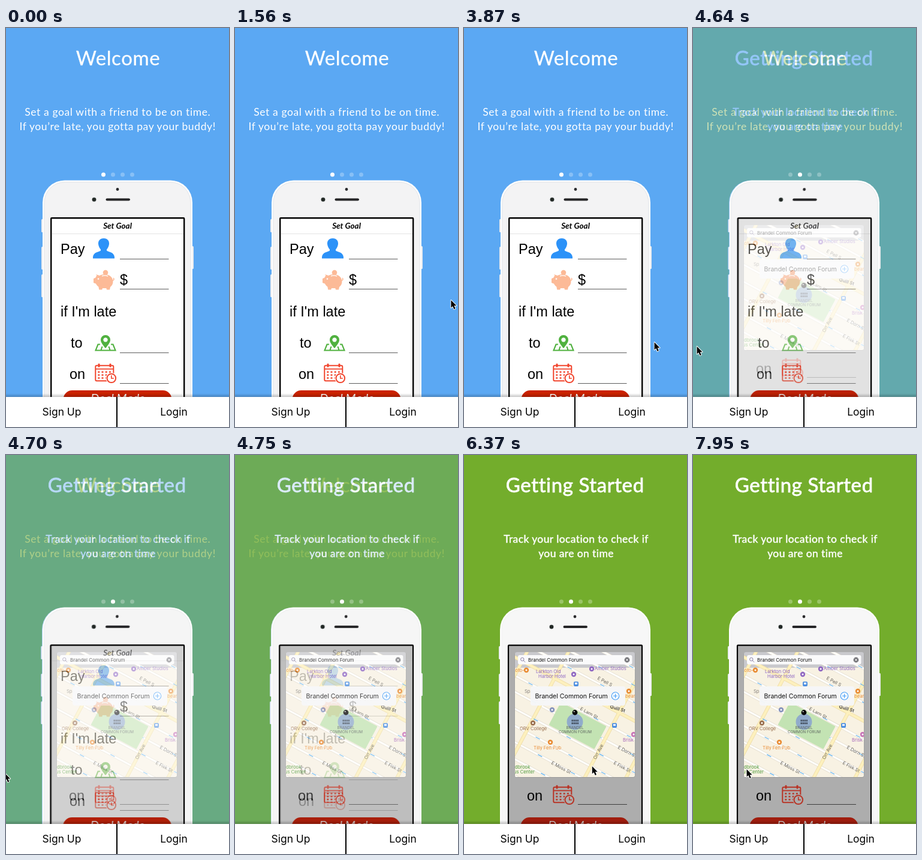
These frames come from a looping animation (372 px wide and 664 px high, 8000 ms). An HTML page:

```html
<!DOCTYPE html>
<html lang="en">
<head>
<meta charset="utf-8">
<title>Welcome tour</title>
<style>
  html, body { margin: 0; width: 100%; height: 100%; overflow: hidden; background: #5ba8f3; }
  svg { display: block; }
  text { white-space: pre; }
  .brand { font-family: Lato, sans-serif; fill: #fff; text-anchor: middle; }
  .title { font-size: 33px; letter-spacing: .6px; }
  .lead { font-size: 17.5px; letter-spacing: .6px; }
  .form { font-family: "Liberation Sans", sans-serif; font-size: 23.5px; }
  .script { font-family: Lato, cursive; font-style: italic; text-anchor: middle; }
  .ui { font-family: Inter, sans-serif; }
  .map { font-family: Inter, "Open Sans", sans-serif; font-size: 7.6px; }
  .tiny { font-size: 6.3px; text-anchor: middle; }
</style>
</head>
<body>
<svg id="stage" width="372" height="664" viewBox="0 0 372 664"></svg>
<script>
const LOOP = 8000;

// ---- drawing helpers ----
const text = (x, y, s, cls, more = '') => `<text x="${x}" y="${y}" class="${cls}" ${more}>${s}</text>`;
const rect = (x, y, w, h, fill, r = 0, more = '') =>
  `<rect x="${x}" y="${y}" width="${w}" height="${h}" rx="${r}" fill="${fill}" ${more}/>`;
const dot = (x, y, r, fill, more = '') => `<circle cx="${x}" cy="${y}" r="${r}" fill="${fill}" ${more}/>`;
const path = (d, fill, more = '') => `<path d="${d}" fill="${fill}" ${more}/>`;
const line = (d, color, w = 1, more = '') => path(d, 'none', `stroke="${color}" stroke-width="${w}" ${more}`);
const move = (x, y, body) => `<g transform="translate(${x} ${y})">${body}</g>`;

function phone(dx, dy, width, face, rim) {
  const x = 61 + dx;
  return [[318, 22], [364, 38], [410, 38]].map(([y, h]) => rect(x - 2, y, 4, h, '#e9ebee', 1.5)).join('')
    + rect(x + width - 2, 363, 4, 38, '#e9ebee', 1.5)
    + rect(x, 253.5, width, 440, '#fdfdfd', 37)
    + rect(x + 3, 256.5, width - 6, 440, face, 34, `stroke="${rim}" stroke-width="1"`)
    + dot(186 + dx, 268.5 + dy, 2.4, '#2b2b2d')
    + dot(147 + dx, 285.5 + dy, 4.2, '#dcdfe0') + dot(147 + dx, 285.5 + dy, 3.3, '#222825')
    + rect(166.5 + dx, 283.4 + dy, 40.5, 4.2, '#262628', 2.1);
}

// ---- form icons ----
const person = path('M163 350c6.5 0 9.5 4.5 9 9.5c-.3 3.5-2 7-4 9v2c3 2.5 12 2 13 10.5v2.5h-36v-2.5c1-8.5 10-8 13-10.5v-2c-2-2-3.7-5.5-4-9c-.5-5 2.5-9.5 9-9.5z', '#2c92f8');

const piggy = (() => {
  const c = '#fcba97';
  return dot(166, 407, 4.3, c)
    + path('M150 410l6 2c3-1.5 6-2 9-2c8 0 13.5 5 13.5 12c0 4-1.8 7-4.5 9l-1 4.5h-5l-.7-2.5h-6.3l-.7 2.5h-5l-1-5c-2-1.3-3.3-3-4.3-5l-4-1.500v-7l3.5-1.5c.5-1.7 1.2-2.7 2-3.5z', c)
    + line('M178 420c2 0 2.7-2.5 1-4', c, 1.6) + dot(154, 417.5, 1.3, '#fff')
    + line('M160 412.8q5.5-1.8 10 .3', '#fff', 1.3);
})();

const place = (() => {
  const c = '#50b13f';
  return line('M157 526.5h-3.5l-4 10h33l-4-10h-3.5M158.5 536l2-6M173.5 536l-2-6', c, 2.1)
    + path('M166 533c-4-5-8-9.5-8-14a8 8 0 0 1 16 0c0 4.5-4 9-8 14zM166 515.2a3.7 3.7 0 1 0 .01 0z', c, 'fill-rule="evenodd"');
})();

function calendar(c, back) {
  const cells = [];
  for (let row = 0; row < 3; row++)
    for (let col = 0; col < 4; col++)
      cells.push(rect(153.3 + col * 6.2, 571.3 + row * 5, 3, 2.4, c));
  const rings = [155, 174].map(x => rect(x - 1.5, 558.5, 3, 6, c, 1)).join('');
  return rect(149.3, 561.8, 30, 25.5, back, 2, `stroke="${c}" stroke-width="2"`)
    + line('M149 567.5h31', c, 1.8) + cells.join('') + rings
    + dot(175.8, 582.8, 9.4, back)
    + dot(175.8, 582.8, 7.3, back, `stroke="${c}" stroke-width="2"`)
    + line('M175.8 578v5h4', c, 1.6);
}

const button = (x, fill, ink) => rect(x, 603, 181, 40, fill, 15)
  + text(x + 91, 623, 'Deal Made', 'script', `font-size="20" fill="${ink}"`);

// ---- pages ----
const welcome = rect(0, 0, 372, 664, '#5ba8f3')
  + text(187, 62, 'Welcome', 'brand title', 'stroke="#fff" stroke-width=".3"')
  + text(186.3, 146, 'Set a goal with a friend to be on time.', 'brand lead')
  + text(186.3, 170, 'If you’re late, you gotta pay your buddy!', 'brand lead')
  + phone(0, 0, 250, '#f3f3f4', '#e4e5e8')
  + rect(75.2, 316.2, 222, 360, '#fff', 1, 'stroke="#000" stroke-width="2.4"')
  + text(186, 334, 'Set Goal', 'script', 'font-size="13.5" font-weight="700"')
  + line('M77 342.5h219', '#e3e3e3')
  + [['Pay', 91, 376], ['$', 190, 427], ["if I'm late", 91, 480], ['to', 108, 532], ['on', 106, 584]]
      .map(([s, x, y]) => text(x, y, s, 'form')).join('')
  + [384.5, 434.5, 540.5, 591.5].map(y => line(`M190 ${y}h81.5`, '#5c5c5c')).join('')
  + person + piggy + place + calendar('#f1452d', '#fff')
  + button(95.5, '#cb2200', '#fff');

function streetMap() {
  const rows = [-125, -100, -75, -21, 3, 28, 53, 77, 102, 127];
  const avenues = [-125, -64, 58, 119];
  const h = v => `M-200 ${v}h400`, w = u => `M${u} -200v400`;
  const all = rows.map(h).join('');
  const wide = h(-48) + avenues.map(w).join('');
  const arrows = rows.map((v, i) => `M${-150 + i * 17 % 60} ${v}h300`).join('');
  const grid = line(all, '#e2dbce', 4.6) + line(all, '#fffefa', 3.2)
    + line(wide, '#ecd9a2', 5.8) + line(wide, '#fdf0bd', 4.4)
    + line(arrows, '#62b1ea', 1.2, 'stroke-dasharray="8 54"')
    + rect(-36, -18, 86, 43, '#c3e3b3', 1);

  const label = (x, y, s, color, turn = 0, cls = '', more = '') =>
    text(0, 0, s, 'map ' + cls, `fill="${color}" transform="translate(${x} ${y}) rotate(${turn})" ${more}`);
  const streets = [[222, 373, 'E Pell S', 28], [193, 424, 'E Larn St', 28], [256, 488, 'E Dorn St', 28],
    [249, 514, 'E Fisk St', 28], [145, 514, 'E Moss St', 28], [220, 507, 'Orr Ave', -62]]
    .map(([x, y, s, a]) => label(x, y, s, '#66635e', a)).join('');

  const purple = '#9068c2', orange = '#e98d35', brown = '#9a7050', blue = '#4e8fe0';
  const spots = [[104, 358, orange], [183, 365, purple], [213, 356, purple], [275, 393, orange], [115, 446, brown],
    [144, 478, orange], [283, 465, '#c873b8'], [147, 424, '#8793bc']]
    .map(([x, y, c]) => dot(x, y, 4.2, c) + dot(x, y, 1.5, '#fff')).join('');
  const stops = [[187, 381], [251, 450]]
    .map(([x, y]) => rect(x - 4, y - 4, 8, 8, blue, 2) + rect(x - 2, y - 2.3, 4, 3, '#fff')).join('');
  const names = [[120, 363, 'Larkton Old', purple], [124, 371, 'Harbor Hotel', purple],
    [218, 358, 'Amber Studios', purple], [83, 361, 'foto-', orange], [101, 396, 'Spa', '#85817b'],
    [269, 404, 'beans', orange], [93, 458, 'ORV College', brown], [116, 490, 'Tilly Fen Pub', orange],
    [265, 477, 'Brisk', '#a565b8'], [85, 522, 'dbrook', '#4f9b3e'], [83, 530, 'us Center', '#4f9b3e']]
    .map(([x, y, s, c]) => label(x, y, s, c)).join('');

  return rect(85, 354, 200, 182, '#f8f2e3')
    + `<g transform="translate(185 444) rotate(28)">${grid}</g>`
    + streets + label(243, 421, 'Quill St', '#4a4844', 16, '', 'font-weight="600"')
    + names + spots + stops
    + dot(185, 444, 13.5, '#7f97d4', 'fill-opacity=".72"')
    + line('M179.5 442h11.5M179.5 446.5h11.5', '#45505f', 2.8, 'stroke-dasharray="2.3 .8"')
    + label(185, 456, 'BRANDEL', '#5f6862', 0, 'tiny')
    + label(185.5, 463, 'COMMON FORUM', '#5f6862', 0, 'tiny');
}

const venue = 'Brandel Common Forum';
const card = rect(84.5, 328, 201, 209, '#8d8d8d', 4, 'opacity=".6"')
  + `<g clip-path="url(#card)">${rect(85, 328, 200, 27, '#c9c9cd')}${streetMap()}</g>`
  + rect(90, 333, 190.5, 15.5, '#fafafb', 3)
  + dot(97.3, 340, 2.7, 'none', 'stroke="#8d83a6" stroke-width="1"') + line('M99.3 342l2.8 2.8', '#8d83a6', 1)
  + text(107, 343.6, venue, 'ui', 'font-size="8" fill="#111"')
  + dot(272, 341, 4.4, '#77777b') + line('M270.3 339.3l3.4 3.4m0-3.4l-3.4 3.4', '#fff', 1)
  + path('M115 385h150a4 4 0 0 1 4 4v24a4 4 0 0 1-4 4h-73l-6 7l-6-7h-65a4 4 0 0 1-4-4v-24a4 4 0 0 1 4-4z', '#f6f7f8', 'fill-opacity=".96"')
  + text(118.5, 404.5, venue, 'ui', 'font-size="10.6" fill="#111"')
  + dot(252.5, 401, 6.2, '#fff', 'stroke="#3c99f5" stroke-width="1.1"')
  + line('M249 401h7m-3.5-3.5v7', '#3c99f5', 1.1)
  + dot(185, 428.5, 4.4, '#0b0b0b') + dot(183.7, 427, 1.1, '#ddd');

const started = rect(0, 0, 372, 664, '#73ad2c')
  + text(185.3, 62, 'Getting Started', 'brand title', 'stroke="#fff" stroke-width=".8"')
  + ['Track your location to check if', 'you are on time'].map((s, i) =>
      text(187, 146 + 24 * i, s, 'brand lead', 'stroke="#fff" stroke-width=".45" style="letter-spacing:.4px"')).join('')
  + phone(-1, .5, 251, '#f7f7f7', '#f2f2f3')
  + rect(74, 316.7, 223, 360, '#adadad', 1, 'stroke="#000" stroke-width="2.2"')
  + card
  + text(105, 575, 'on', 'form') + line('M190 581.5h82', '#3f3f3f')
  + move(0, -9, calendar('#b83426', '#adadad'))
  + button(94.5, '#a01d0e', '#cfc0be');

const bar = rect(0, 608, 372, 6, 'url(#shade)') + rect(0, 614, 372, 50, '#fff') + rect(184, 614, 2, 50, '#000')
  + text(93, 645, 'Sign Up', 'ui', 'font-size="17.4" text-anchor="middle"')
  + text(280, 645, 'Login', 'ui', 'font-size="17.4" text-anchor="middle"');

const stage = document.getElementById('stage');
stage.innerHTML = `<defs>
  <clipPath id="card">${rect(85, 328, 200, 208, '#000', 3)}</clipPath>
  <linearGradient id="shade" x2="0" y2="1"><stop stop-opacity="0"/><stop offset="1" stop-opacity=".22"/></linearGradient>
  </defs>
  <g>${welcome}</g><g id="next">${started}</g>
  <g id="dots">${[0, 1, 2, 3].map(i => dot(162.5 + 16 * i, 244, 3.5, '#fff')).join('')}</g>
  ${bar}
  <g id="cursor">${path('M.6 1V13.6L3.4 11L5.6 16L7.8 15L5.7 10.2H9.6Z', '#000',
    'stroke="#fff" stroke-width="1.9" stroke-linejoin="round" paint-order="stroke"')}</g>`;

// ---- motion ----
// Each run: start, end, number of steps.
const runs = [[1440, 1970, 10], [2150, 2620, 9], [3400, 4110, 13], [4230, 4230, 1], [4530, 4810, 6],
  [5710, 5830, 3], [6070, 6820, 14], [7300, 7590, 6], [7830, 7950, 3]];
// Pointer tip: time, x, y.
const tips = [[0, 400, 449], [1440, 366, 449], [1970, 338, 462],
  [2150, 334, 462], [2450, 92, 428], [2620, 51, 433],
  [3400, 53, 434], [3640, 165, 462], [3873, 317, 522], [3990, 319, 537], [4110, 310, 544], [4230, 309, 543],
  [4530, 285, 542], [4642, 6, 529], [4754, -11, 528], [4810, -40, 528],
  [5710, -8, 531], [5770, -4, 531], [5830, -14, 531],
  [6070, 2, 532], [6358, 213, 517], [6500, 266, 514], [6820, 315, 529],
  [7300, 320, 531], [7590, 346, 541], [7830, 330, 539], [7950, 89, 522]];

function stepTime(t) {
  const run = runs.filter(r => r[0] <= t).pop();
  if (!run) return 0;
  const [a, b, n] = run;
  if (n === 1) return a;
  const gap = (b - a) / (n - 1);
  return a + gap * Math.min(n - 1, Math.floor((t - a) / gap + .1));
}

function tipAt(t) {
  const i = tips.findIndex(k => k[0] > t);
  if (i < 0) return tips[tips.length - 1].slice(1);
  const [a, b] = [tips[i - 1], tips[i]];
  const f = (t - a[0]) / (b[0] - a[0]);
  return [1, 2].map(j => a[j] + (b[j] - a[j]) * f);
}

const next = document.getElementById('next');
const cursor = document.getElementById('cursor');
const dots = [...document.getElementById('dots').children];

function draw(now) {
  const t = stepTime(now % LOOP);
  const fade = Math.max(0, Math.min(1, (t - 4553) / 257));
  next.setAttribute('opacity', fade);
  const active = fade > 0 ? 1 : 0;
  dots.forEach((d, i) => d.setAttribute('opacity', i === active ? 1 : .28));
  cursor.setAttribute('transform', `translate(${tipAt(t).map(v => v.toFixed(1)).join(' ')})`);
}

const begin = performance.now();
function tick() {
  draw(performance.now() - begin);
  requestAnimationFrame(tick);
}
tick();
</script>
</body>
</html>
```
